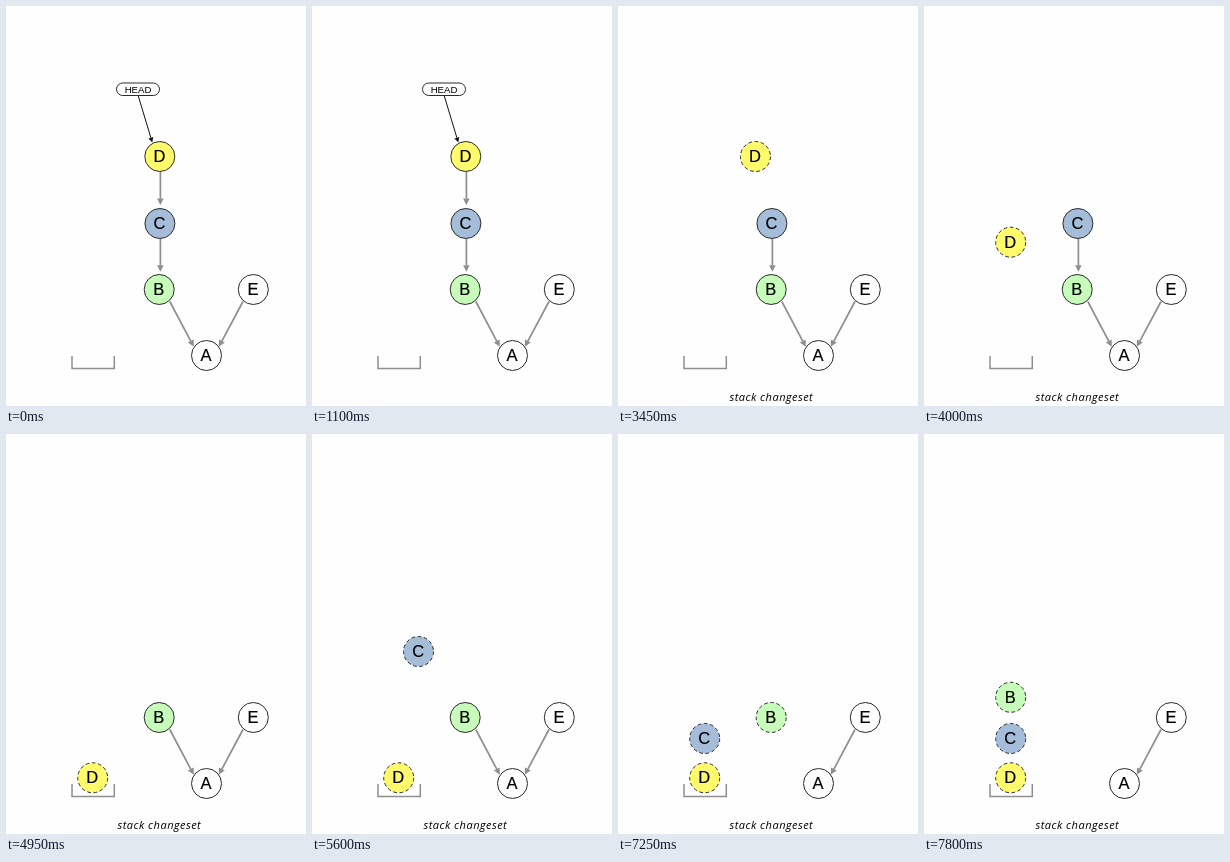
Animation of 300 by 400 pixels, one loop 8 s. Source, as an HTML page:

```html
<!DOCTYPE html>
<html lang="en">
<head>
<meta charset="utf-8">
<title>Stacking changesets</title>
<style>
  html, body { margin: 0; width: 100%; height: 100%; overflow: hidden; background: #fefefe; }
  svg { display: block; width: 300px; height: 400px; }
  text { text-anchor: middle; fill: #000; font-family: "Liberation Sans", Arial, sans-serif; }
  .letter { font-size: 16.5px; stroke: #000; stroke-width: 0.2px; }
  .head { font-size: 9.6px; }
  .note { font: italic 500 11px "Open Sans", sans-serif; letter-spacing: 0.5px; }
</style>
</head>
<body>
<svg id="stage" viewBox="0 0 300 400"></svg>
<script>
const LOOP = 8000;
const GREY = '#8e8e8e';
const INK = '#2a2a2a';
const STACK_X = 86.7;
const stage = document.getElementById('stage');

function add(parent, tag, attrs, label) {
  const el = document.createElementNS('http://www.w3.org/2000/svg', tag);
  for (const key in attrs) el.setAttribute(key, attrs[key]);
  if (label) el.textContent = label;
  parent.appendChild(el);
  return el;
}

const group = () => add(stage, 'g', {});

function arrow(parent, x1, y1, x2, y2, color, width, size) {
  const a = Math.atan2(y2 - y1, x2 - x1);
  const bx = x2 - size * Math.cos(a), by = y2 - size * Math.sin(a);
  const dx = -Math.sin(a) * size * 0.5, dy = Math.cos(a) * size * 0.5;
  add(parent, 'line', { x1, y1, x2: bx, y2: by, stroke: color, 'stroke-width': width });
  add(parent, 'polygon', {
    points: `${x2},${y2} ${bx + dx},${by + dy} ${bx - dx},${by - dy}`, fill: color
  });
}

const greyArrow = (parent, ...ends) => arrow(parent, ...ends, GREY, 1.7, 6.5);

function node(parent, name, x, y, fill, dashed) {
  const circle = add(parent, 'circle', {
    cx: x, cy: y, r: 15, fill, stroke: INK, 'stroke-width': 1
  });
  if (dashed) circle.setAttribute('stroke-dasharray', '3.7 2.6');
  add(parent, 'text', { x: x - 0.4, y: y + 5.5, class: 'letter' }, name);
}

// Fixed parts
const base = group();
add(base, 'path', { d: 'M66 350V362.5H108.3V350', fill: 'none', stroke: GREY, 'stroke-width': 1.5 });
greyArrow(base, 237, 295.5, 212.8, 340.8);
node(base, 'A', 200.5, 349.5, '#fefefe');
node(base, 'E', 247.3, 283.5, '#fefefe');

const head = group();
add(head, 'rect', {
  x: 110.5, y: 77, width: 43, height: 12.5, rx: 6.2, fill: '#fefefe', stroke: INK, 'stroke-width': 1
});
add(head, 'text', { x: 132, y: 86.6, class: 'head' }, 'HEAD');
arrow(head, 132.3, 90, 146.3, 136.5, '#111', 1, 5);

const note = group();
add(note, 'text', { x: 153.3, y: 394.8, class: 'note' }, 'stack changeset');

// out: solid node fades; back: dashed copy appears; steps: [delay, duration, x, y]
const items = [
  { name: 'D', x: 153.8, y: 150.5, fill: '#fefa6c', link: [154.4, 166, 154.4, 199],
    out: 2785, back: 3085, steps: [[205, 490, STACK_X, 150.5], [698, 470, STACK_X, 343.8]] },
  { name: 'C', x: 153.9, y: 217.5, fill: '#a5bdd8', link: [154.4, 233, 154.4, 265.8],
    out: 4785, back: 5085, steps: [[205, 490, STACK_X, 217.5], [698, 470, STACK_X, 304.5]] },
  { name: 'B', x: 153.2, y: 283.5, fill: '#c6fbba', link: [163.8, 295.5, 187.8, 340.8],
    out: 6785, back: 7085, steps: [[205, 490, STACK_X, 263.3]] }
];

for (const it of items) {
  it.solid = group();
  greyArrow(it.solid, ...it.link);
  node(it.solid, it.name, it.x, it.y, it.fill);
}
for (const it of items) {
  it.ghost = group();
  node(it.ghost, it.name, 0, 0, it.fill, true);
}

function ease(t, start, length) {
  const p = Math.min(1, Math.max(0, (t - start) / length));
  return (1 - Math.cos(Math.PI * p)) / 2;
}

function place(it, t) {
  let { x, y } = it;
  for (const [delay, length, tx, ty] of it.steps) {
    const k = ease(t, it.back + delay, length);
    x += (tx - x) * k;
    y += (ty - y) * k;
  }
  it.ghost.setAttribute('transform', `translate(${x.toFixed(2)} ${y.toFixed(2)})`);
}

function draw(t) {
  head.setAttribute('opacity', 1 - ease(t, 2085, 215));
  note.setAttribute('opacity', ease(t, 3085, 165));
  for (const it of items) {
    it.solid.setAttribute('opacity', 1 - ease(t, it.out, 165));
    it.ghost.setAttribute('opacity', ease(t, it.back, 165));
    place(it, t);
  }
}

const began = performance.now();
function tick() {
  draw((performance.now() - began) % LOOP);
  requestAnimationFrame(tick);
}
draw(0);
requestAnimationFrame(tick);
</script>
</body>
</html>
```
